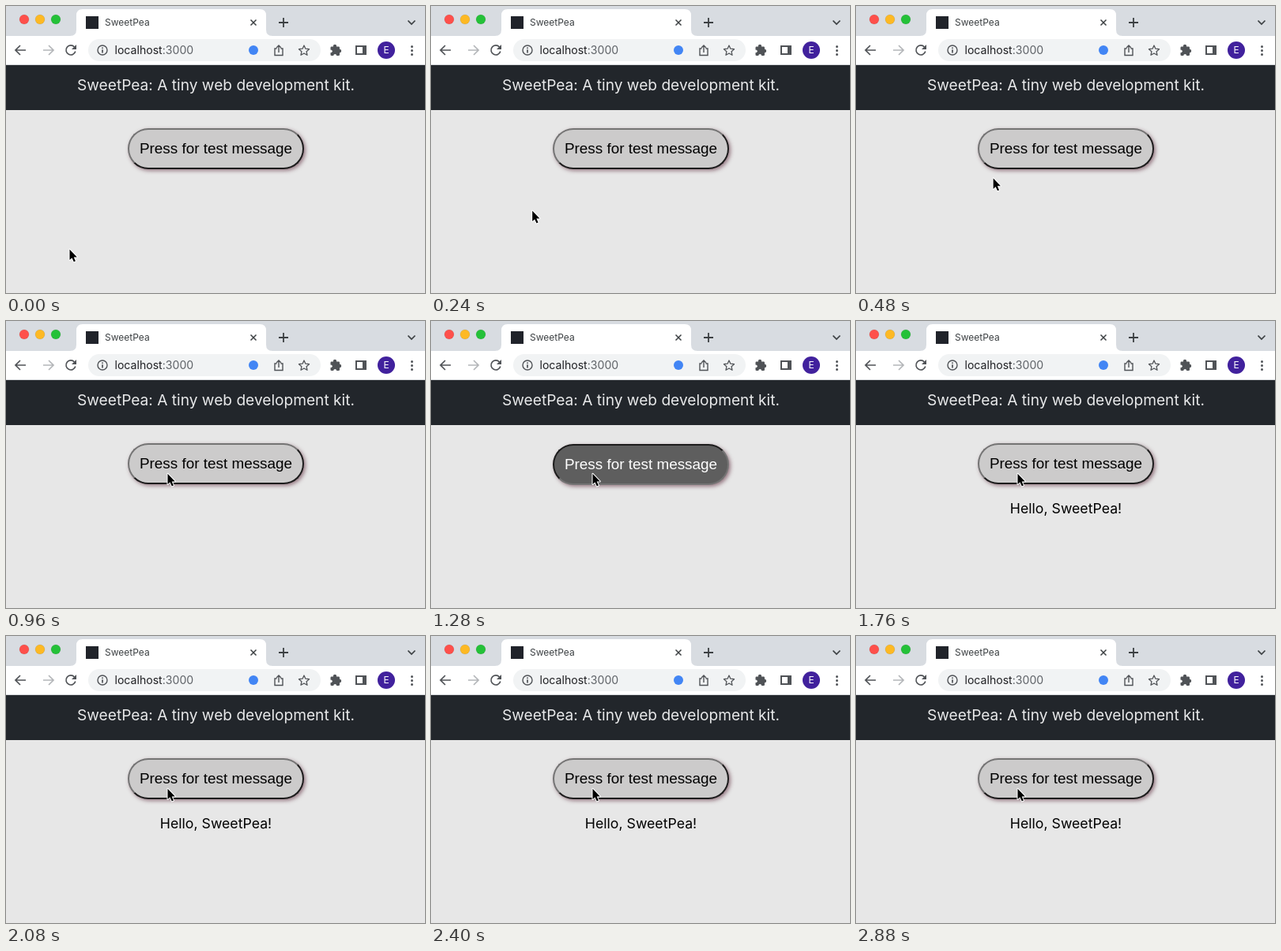
Animation, 530 px wide and 364 px high, one loop 2.96 s. Source, as an HTML page:

```html
<!DOCTYPE html>
<html lang="en">
<head>
<meta charset="utf-8">
<title>SweetPea</title>
<style>
  html, body { margin: 0; width: 100%; height: 100%; overflow: hidden; background: #e7e7e7; }
  svg { position: absolute; left: 0; top: 0; font-family: Inter, sans-serif; }
  .line { fill: none; stroke: #505357; stroke-width: 1.7; }
  .solid { fill: #505357; }
  .light { stroke: #0002; stroke-width: .6; }
  #button {
    position: absolute; left: 154px; top: 155px; width: 223px; height: 52px;
    box-sizing: border-box; border: 2px solid; border-radius: 26px;
    border-color: #747474 #1c1c1c #1c1c1c #747474;
    background: #cccbcb; color: #000;
    box-shadow: 2px 2px 5px rgba(105, 60, 75, .65);
    font: 18.9px/48px "Liberation Sans", Arial, sans-serif;
    text-align: center; white-space: nowrap;
  }
  #button.pressed {
    top: 156px; background: #5e5e5e; color: #fff;
    border-color: #1c1c1c #747474 #747474 #1c1c1c;
  }
</style>
</head>
<body>
<svg width="530" height="364">
  <!-- Tab strip -->
  <rect width="530" height="38" fill="#d8dce1"/>
  <circle class="light" cx="23" cy="17" r="6" fill="#fe504b"/>
  <circle class="light" cx="43" cy="17" r="6" fill="#fdb924"/>
  <circle class="light" cx="63" cy="17" r="6" fill="#24c138"/>
  <path d="M81 38q8 0 8-8V12q0-8 8-8H321q8 0 8 8V30q0 8 8 8z" fill="#fff"/>
  <rect x="101" y="13" width="16" height="16" fill="#20232a"/>
  <text x="125" y="25" font-size="12" fill="#3c4043">SweetPea</text>
  <path class="line" d="M309.5 17.5l7 7m0-7l-7 7" style="stroke:#3c4043;stroke-width:1.5"/>
  <path class="line" d="M351 15v12m-6-6h12" style="stroke:#3c4043;stroke-width:1.8"/>
  <path class="line" d="M508.5 18.5l4.5 4.5 4.5-4.5" style="stroke:#3c4043"/>

  <!-- Toolbar -->
  <rect y="38" width="530" height="37" fill="#fff"/>
  <rect y="74" width="530" height="1" fill="#d5d7da"/>
  <rect x="104" y="42" width="294" height="28" rx="14" fill="#f1f3f4"/>
  <path class="line" d="M25 56H12m6-6l-6 6 6 6"/>
  <path class="line" d="M47 56h13m-6-6l6 6-6 6" style="stroke:#b4b6b9"/>
  <path class="line" d="M86.5 52a6 6 0 1 0 1.3 5.5"/>
  <path class="solid" d="M89 49v6h-6z"/>
  <circle class="line" cx="122" cy="56" r="6" style="stroke-width:1.4"/>
  <path class="line" d="M122 52.5v1.5m0 1.3v4.2"/>
  <text x="137.5" y="61" font-size="14.1" fill="#202124">localhost<tspan fill="#5f6368">:3000</tspan></text>
  <circle cx="313" cy="56" r="6" fill="#4285f4"/>
  <path class="line" style="stroke-width:1.4" d="M342.5 54H340v8.5h10V54h-2.5M345 59v-9m-3 3l3-3 3 3"/>
  <path class="line" style="stroke-width:1.3" stroke-linejoin="round"
        d="M377 50l1.9 4.2 4.6.5-3.4 3.1.9 4.5-4-2.3-4 2.3.9-4.5-3.4-3.1 4.6-.5z"/>
  <g class="solid">
    <rect x="410.5" y="51.5" width="11.5" height="11.5" rx="1.2"/>
    <circle cx="416" cy="51" r="2.2"/>
    <circle cx="422" cy="57" r="2.2"/>
    <circle cx="410.8" cy="57.3" r="1.9" fill="#fff"/>
    <circle cx="416.2" cy="62.8" r="1.9" fill="#fff"/>
  </g>
  <rect class="line" x="443" y="51" width="12" height="10" style="stroke-width:2"/>
  <path class="solid" d="M451 50h5v12h-5z"/>
  <circle cx="481" cy="56" r="11" fill="#41219d"/>
  <text x="481" y="60.3" font-size="12" fill="#fff" text-anchor="middle">E</text>
  <g class="solid">
    <circle cx="513.5" cy="51.5" r="1.5"/>
    <circle cx="513.5" cy="56.5" r="1.5"/>
    <circle cx="513.5" cy="61.5" r="1.5"/>
  </g>

  <!-- Page -->
  <rect y="75" width="530" height="57" fill="#22262b"/>
  <text x="265.5" y="107" font-size="19.14" fill="#e8e9ea" text-anchor="middle">SweetPea: A tiny web development kit.</text>
  <text id="message" x="265.5" y="244" font-size="17.7" text-anchor="middle">Hello, SweetPea!</text>
</svg>
<div id="button">Press for test message</div>
<svg width="530" height="364">
  <path id="cursor" d="M0 0V13.4L3 10.7 5.3 15.8 7.4 14.9 5.2 9.8H9.3z"
        stroke="#fff" stroke-width="2" paint-order="stroke" stroke-linejoin="round"/>
</svg>
<script>
  const LOOP = 2960;
  const PRESS = 1280, RELEASE = 1760;
  const MOVE_START = 60, MOVE_END = 900;
  const [button, message, cursor] =
    ["button", "message", "cursor"].map(id => document.getElementById(id));

  function draw() {
    const t = performance.now() % LOOP;
    const u = Math.min(1, Math.max(0, (t - MOVE_START) / (MOVE_END - MOVE_START)));
    const across = 1 - (1 - u) ** 2;
    const up = across + 0.176 * across * (1 - across);
    cursor.setAttribute("transform", `translate(${80.5 + 124 * across} ${308.7 - 115 * up})`);
    button.classList.toggle("pressed", t >= PRESS && t < RELEASE);
    message.style.visibility = t >= RELEASE ? "visible" : "hidden";
    requestAnimationFrame(draw);
  }
  draw();
</script>
</body>
</html>
```
